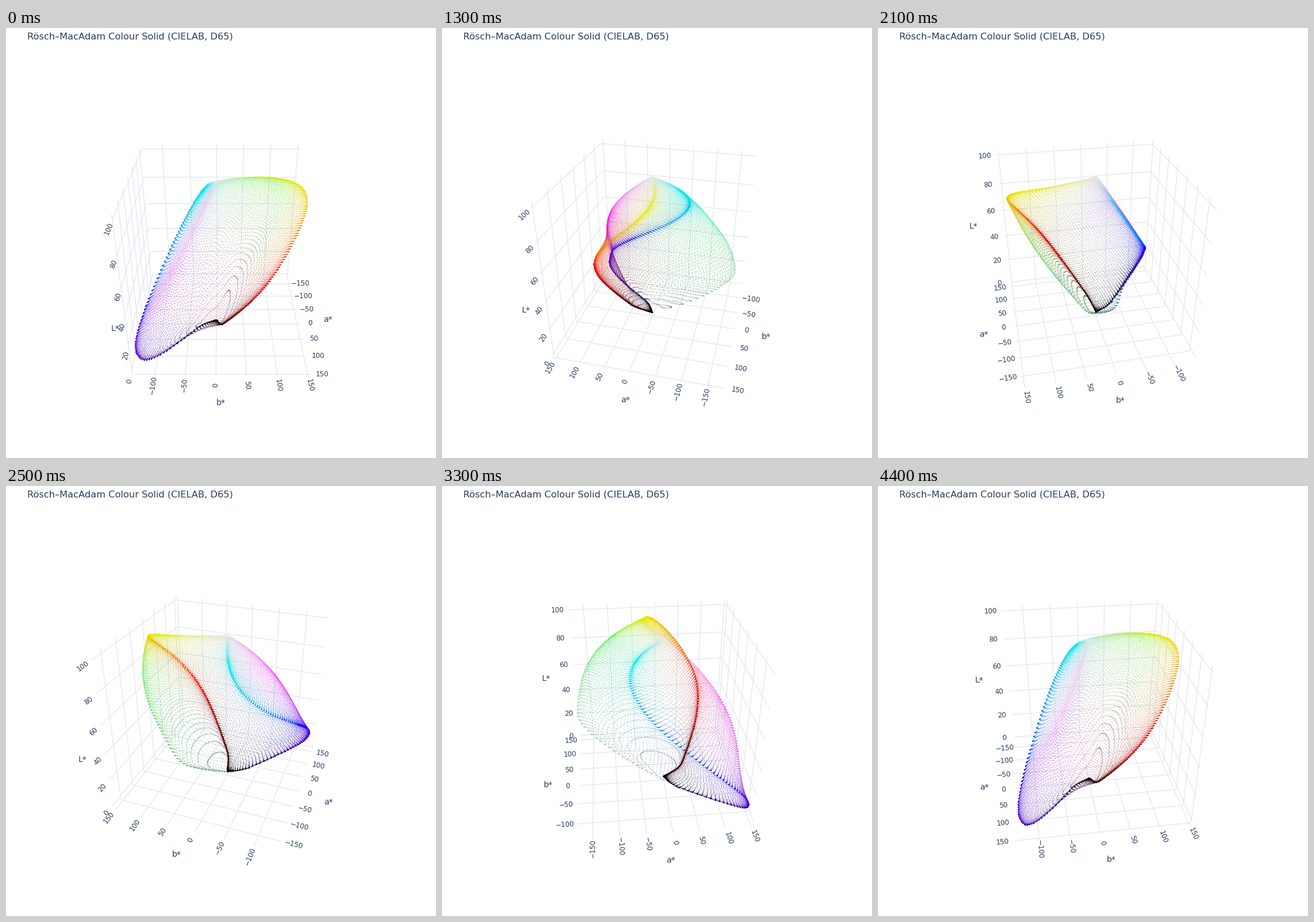
A matplotlib script that plays this animation: 748 by 748 pixels, repeating every 4.5 s.

```python
import numpy as np
import matplotlib.pyplot as plt
from matplotlib.animation import FuncAnimation
from matplotlib.collections import LineCollection

SIZE, FRAMES, INTERVAL = 748, 45, 100
INK, GRID = "#2a3f5f", "#e0e5ee"
FOCAL, CX, CY = 853, 374, 392
EYE_R, EYE_Z = 2.5, 1.5
DIST = np.hypot(EYE_R, EYE_Z)
COS_E, SIN_E = EYE_R / DIST, EYE_Z / DIST
TICK_GAP, NAME_GAP = 0.07, 0.193
ALPHA = 0.18

# CIE 1931 observer and D65, every 20 nm from 380 to 780
XBAR = [.001368, .01431, .13438, .34828, .2908, .09564, .0049, .06327, .2904,
        .5945, .9163, 1.0622, .85445, .4479, .1649, .04677, .011359, .002899,
        .00069, .000166, .0000415]
YBAR = [.000039, .000396, .004, .023, .06, .13902, .323, .71, .954, .995, .87,
        .631, .381, .175, .061, .017, .004102, .001047, .000249, .00006, .000015]
ZBAR = [.00645, .06785, .6456, 1.74706, 1.6692, .81295, .272, .07825, .0203,
        .0039, .00165, .0008, .00019, .00002] + [1e-6] * 7
D65 = [50, 82.8, 93.4, 104.9, 117.8, 115.9, 109.4, 104.8, 104.4, 100, 95.8,
       90, 87.7, 83.7, 80.2, 78.3, 71.6, 61.6, 75.1, 46.4, 63.4]


def spline(y, t):
    """Natural cubic spline through evenly spaced knots."""
    y = np.asarray(y)
    n = len(y) - 2
    system = 4 * np.eye(n) + np.eye(n, k=1) + np.eye(n, k=-1)
    m = np.pad(np.linalg.solve(system, 6 * np.diff(y, 2)), 1)
    i = np.minimum(t.astype(int), n)
    f = t - i
    g = 1 - f
    return g * y[i] + f * y[i + 1] + ((g**3 - g) * m[i] + (f**3 - f) * m[i + 1]) / 6


def optimal_colours(step=2):
    """XYZ, relative to white, of every band-pass and band-stop reflectance."""
    t = np.arange(380, 780, step) / 20 - 19
    light = np.interp(t, np.arange(21), D65)
    power = np.stack([np.exp(spline(np.log(c), t)) * light
                      for c in (XBAR, YBAR, ZBAR)], axis=1)
    power /= power.sum(axis=0)
    n = len(t)
    total = np.vstack([np.zeros(3), np.cumsum(np.vstack([power, power]), axis=0)])
    start, width = np.mgrid[0:n, 0:n + 1]
    return np.clip((total[start + width] - total[start]).reshape(-1, 3), 0, 1)


def to_lab(xyz):
    f = np.where(xyz > 0.008856, np.cbrt(xyz), 7.787 * xyz + 16 / 116)
    x, y, z = f.T
    return np.stack([500 * (x - y), 200 * (y - z), 116 * y - 16], axis=1)


def to_srgb(xyz):
    m = np.array([[3.2406, -1.5372, -0.4986],
                  [-0.9689, 1.8758, 0.0415],
                  [0.0557, -0.2040, 1.0570]])
    lin = np.clip(xyz * [0.9505, 1, 1.089] @ m.T, 0, 1)
    return np.where(lin > 0.0031308, 1.055 * lin ** (1 / 2.4) - 0.055, 12.92 * lin)


xyz = optimal_colours()
lab = to_lab(xyz)
rgb = to_srgb(xyz) * 0.92
lo, hi = lab.min(axis=0), lab.max(axis=0)
MID, SPAN = (lo + hi) / 2, (hi - lo) * 17 / 16
solid = (lab - MID) / SPAN

VALUES = [np.arange(-150, 151, 50), np.arange(-100, 151, 50), np.arange(0, 101, 20)]
TICKS = [(v - MID[k]) / SPAN[k] for k, v in enumerate(VALUES)]


def project(points, theta):
    x, y, z = np.moveaxis(np.asarray(points, float), -1, 0)
    near = x * np.cos(theta) + y * np.sin(theta)
    right = y * np.cos(theta) - x * np.sin(theta)
    scale = FOCAL / (DIST - near * COS_E - z * SIN_E)
    return np.stack([CX + scale * right,
                     CY - scale * (z * COS_E - near * SIN_E)], axis=-1)


def back_walls(theta):
    """Sides (-1 or 1) of the a and b walls that face the viewer."""
    return (-1 if np.cos(theta) > 0 else 1,
            -1 if np.sin(theta) > -1e-9 else 1)


def grid_lines(theta):
    wall = [s / 2 for s in back_walls(theta)] + [-0.5]
    lines = []
    for k, ticks in enumerate(TICKS):
        for run in range(3):
            if run == k:
                continue
            for t in ticks:
                ends = np.array([wall, wall], float)
                ends[:, k] = t
                ends[:, run] = -0.5, 0.5
                lines.append(ends)
    return project(np.array(lines), theta)


def label_edges(theta):
    """For each axis: a point on its labelled edge and the outward direction."""
    wa, wb = back_walls(theta)
    out_a, out_b = np.array([-wa, 0, 0]), np.array([0, -wb, 0])
    front = np.array([-wa, -wb, -1]) / 2
    side_a, side_b = np.array([-wa, wb, 0]) / 2, np.array([wa, -wb, 0]) / 2
    if project(side_a, theta)[0] < project(side_b, theta)[0]:
        upright = side_a, out_a
    else:
        upright = side_b, out_b
    return [(front, out_b), (front, out_a), upright]


X0, X1, Y0, Y1 = 100, 650, 170, 690
W, H = X1 - X0, Y1 - Y0


def splat(theta):
    """Blend all points as translucent 2 px squares."""
    u, v = np.rint(project(solid, theta)).astype(int).T
    cell = (v - 1 - Y0) * W + u - 1 - X0
    cell = np.concatenate([cell, cell + 1, cell + W, cell + W + 1])
    count = np.bincount(cell, minlength=W * H)
    image = np.empty((W * H, 4))
    for k in range(3):
        total = np.bincount(cell, np.tile(rgb[:, k], 4), minlength=W * H)
        image[:, k] = total / np.maximum(count, 1)
    image[:, 3] = 1 - (1 - ALPHA) ** count
    return np.rint(image * 255).astype(np.uint8).reshape(H, W, 4)


def px(size):
    return size * 0.72


plt.rcParams["font.family"] = "DejaVu Sans"
fig = plt.figure(figsize=(SIZE / 100, SIZE / 100), dpi=100, facecolor="white")
ax = fig.add_axes([0, 0, 1, 1])
ax.axis("off")

grid = LineCollection([], colors=GRID, linewidths=px(1.2), zorder=1)
ax.add_collection(grid)
cloud = ax.imshow(np.zeros((H, W, 4), np.uint8), extent=(X0, X1, Y1, Y0),
                  interpolation="nearest", aspect="auto", zorder=2)
ax.set_xlim(0, SIZE)
ax.set_ylim(SIZE, 0)


def label(text, size):
    return ax.text(0, 0, text, color=INK, fontsize=px(size),
                   ha="center", va="center", zorder=3)


ax.text(37.4, 19, "Rösch–MacAdam Colour Solid (CIELAB, D65)", color=INK,
        fontsize=px(16.3), ha="left", va="baseline")
tick_labels = [[label(str(v).replace("-", "−"), 12) for v in vals] for vals in VALUES]
names = [label(s, 14) for s in ("a*", "b*", "L*")]


def place_labels(theta):
    for k, (base, out) in enumerate(label_edges(theta)):
        for t, text in zip(TICKS[k], tick_labels[k]):
            p = base.astype(float)
            p[k] = t
            edge, spot = project([p, p + out * TICK_GAP], theta)
            du, dv = spot - edge
            angle = np.degrees(np.arctan2(-dv, du))
            text.set_position(spot)
            text.set_rotation((angle + 90) % 180 - 90)
        p = base.astype(float)
        p[k] = 0
        names[k].set_position(project(p + out * NAME_GAP, theta))


def update(i):
    theta = 2 * np.pi * i / FRAMES
    grid.set_segments(grid_lines(theta))
    cloud.set_data(splat(theta))
    place_labels(theta)
    return [grid, cloud]


anim = FuncAnimation(fig, update, frames=FRAMES, interval=INTERVAL,
                     repeat=True, repeat_delay=0, blit=False)
plt.show()
```
